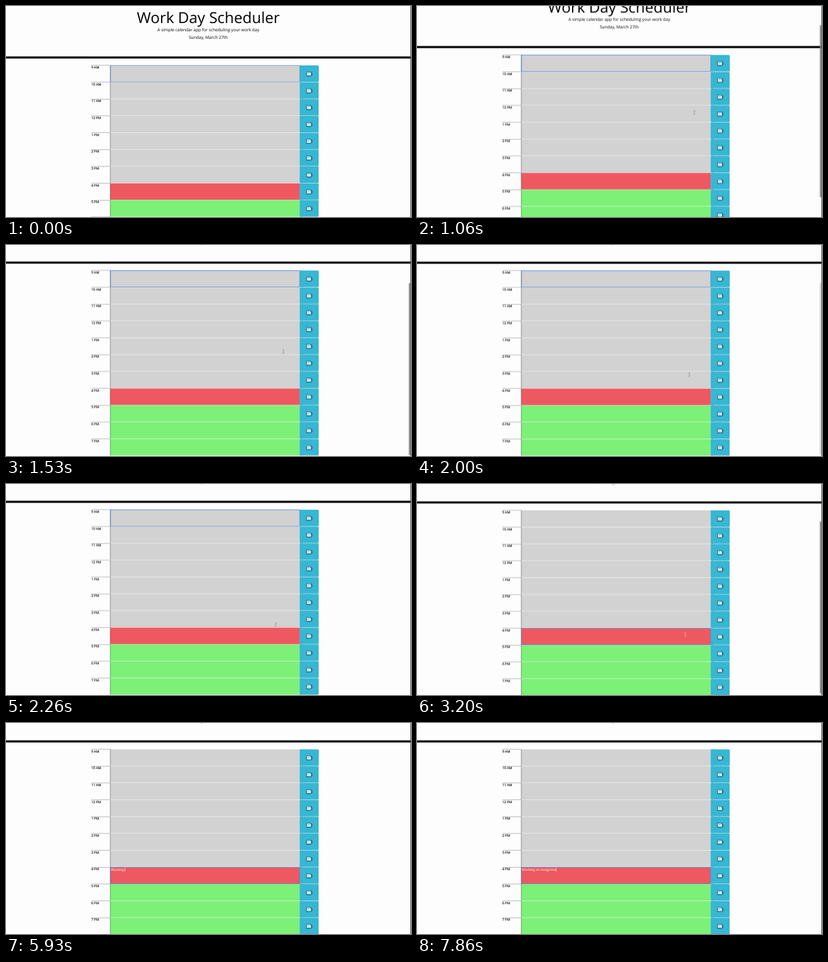
An HTML page that plays this animation: 640 px wide and 334 px high, repeating every 8000 ms.

```html
<!DOCTYPE html>
<html lang="en">
<head>
<meta charset="utf-8">
<title>Work Day Scheduler</title>
<style>
  html, body { margin: 0; width: 100%; height: 100%; overflow: hidden; background: #fdfdfd; }
  svg { display: block; width: 640px; height: 334px; }
  text { font: 16px "Open Sans", "Noto Sans", sans-serif; fill: #000; text-rendering: geometricPrecision; }
  .mid { text-anchor: middle; }
  .title { font-size: 72px; }
  .lead { font-size: 20px; }
  .hour { stroke: #000; stroke-width: .3; }
  .note { fill: #fff; white-space: pre; }
  .ring { fill: none; stroke: #4f86d6; stroke-width: 2.4; }

  #page, #thumb, #ringA, #ringB, #mouse { animation: 8s linear infinite; }
  #page { animation-name: scroll; }
  #thumb { animation-name: thumb, fade; }
  #ringA { animation-name: ringA; animation-timing-function: step-end; }
  #ringB { animation-name: ringB; animation-timing-function: step-end; }
  #mouse { animation-name: move, show; animation-timing-function: linear, step-end; }

  @keyframes scroll {
    0% { transform: translateY(0); }
    5% { transform: translateY(0); animation-timing-function: ease-in; }
    15.75% { transform: translateY(-76.5px); animation-timing-function: ease-out; }
    19.125% { transform: translateY(-161px); }
    28.25% { transform: translateY(-160px); }
    35.75% { transform: translateY(-160px); }
    37.5%, 100% { transform: translateY(-157px); }
  }
  @keyframes thumb {
    0% { transform: translateY(0); }
    5% { transform: translateY(0); animation-timing-function: ease-in; }
    15.75% { transform: translateY(61px); animation-timing-function: ease-out; }
    19.125% { transform: translateY(129px); }
    28.25%, 35.75% { transform: translateY(128px); }
    37.5%, 100% { transform: translateY(126px); }
  }
  @keyframes fade {
    0%, 5% { opacity: 0; }
    6%, 22% { opacity: 1; }
    27%, 35.7% { opacity: 0; }
    35.75%, 42.5% { opacity: 1; }
    47.5%, 100% { opacity: 0; }
  }
  @keyframes ringA {
    0% { opacity: .8; }
    .75% { opacity: 1; }
    37.5%, 100% { opacity: 0; }
  }
  @keyframes ringB {
    0% { opacity: 0; }
    37.5%, 100% { opacity: 1; }
  }
  @keyframes move {
    0%, 20% { transform: translate(1315px, 506px); animation-timing-function: ease-in-out; }
    28.25% { transform: translate(1279px, 667px); animation-timing-function: ease-in-out; }
    35.75%, 100% { transform: translate(1272px, 715px); }
  }
  @keyframes show {
    0% { opacity: 0; stroke: #808080; }
    5% { opacity: 1; stroke: #808080; }
    34% { opacity: 1; stroke: #f6c4c6; }
    60%, 100% { opacity: 0; stroke: #f6c4c6; }
  }
</style>
</head>
<body>
<svg viewBox="0 0 1920 1002">
  <defs>
    <g id="disk">
      <path d="M-12 -9H6Q15 -7 15 1T6 11H-12Z" fill="#2288a6" stroke="#1a5a73" stroke-width="2.5" stroke-linejoin="round"/>
      <path d="M-10 -8H4L8 -4V8H-10Z" fill="#f4fbfd"/>
      <path d="M-6 -5H3V-2H-6Z" fill="#3d93ad"/>
      <circle cx="-1" cy="4" r="2.2" fill="#3d93ad"/>
    </g>
  </defs>
  <g id="page">
    <text class="mid title" x="959" y="82">Work Day Scheduler</text>
    <text class="mid lead" x="959" y="119">A simple calendar app for scheduling your work day</text>
    <text class="mid lead" x="959" y="155">Sunday, March 27th</text>
    <rect y="239.5" width="1920" height="10"/>
    <g id="rows"></g>
    <rect class="ring" id="ringA" x="495.5" y="282.5" width="897" height="78"/>
    <rect class="ring" id="ringB" x="495.5" y="842.5" width="897" height="78"/>
    <text class="note" id="note" x="497" y="858"></text>
    <rect id="caret" y="844" width="2.5" height="18" fill="#fff"/>
  </g>
  <rect id="thumb" x="1910" y="51" width="6" height="818" rx="3" fill="#7c7c7c"/>
  <rect x="1917" width="3" height="1002" fill="#555"/>
  <path id="mouse" d="M-4 -9Q0 -9 0 -6Q0 -9 4 -9M0 -6V6M-4 9Q0 9 0 6Q0 9 4 9" fill="none" stroke-width="2"/>
</svg>
<script>
  const $ = id => document.getElementById(id);
  const LOOP = 8000;
  const PAST = "#d2d2d2", NOW = "#ee5861", NEXT = "#7df078";

  const row = i => {
    const hour = 9 + i, y = 281 + i * 80;
    const label = `${hour > 12 ? hour - 12 : hour} ${hour < 12 ? "AM" : "PM"}`;
    const fill = hour < 16 ? PAST : hour > 16 ? NEXT : NOW;
    return `<rect x="404" y="${y}" width="91" height="1.5" fill="#777"/>
      <text class="hour" x="404" y="${y + 16}">${label}</text>
      <rect x="494" y="${y + 1}" width="899" height="78.5" fill="${fill}"/>
      <rect x="494" y="${y + 1}" width="1.5" height="78.5" fill="#444"/>
      <rect x="1393" y="${y + 1}" width="90" height="78.5" rx="5" fill="#38b6d2"/>
      <rect x="1393" y="${y + 1}" width="12" height="78.5" fill="#38b6d2"/>
      <use href="#disk" x="1437" y="${y + 41}"/>`;
  };
  $("rows").innerHTML = Array.from({ length: 11 }, (_, i) => row(i)).join("");

  const phrase = "Working on Assignmen";
  const keyTimes = [4800, 4930, 5060, 5130, 5260, 5400, 5600, 5730, 5930, 6060,
    6260, 6530, 6660, 6860, 6930, 7060, 7130, 7330, 7600, 7860];
  const blinks = [[3400, 3800], [4200, 4660], [4800, LOOP]];

  const clock = $("page").getAnimations()[0];
  let typed = -1;

  function draw() {
    const t = (clock.currentTime || 0) % LOOP;
    const count = keyTimes.filter(k => k <= t).length;
    if (count !== typed) {
      typed = count;
      $("note").textContent = phrase.slice(0, count);
      $("caret").setAttribute("x", 497 + (count ? $("note").getComputedTextLength() : 0));
    }
    $("caret").style.opacity = blinks.some(([a, b]) => t >= a && t < b) ? 1 : 0;
    requestAnimationFrame(draw);
  }
  draw();
</script>
</body>
</html>
```
